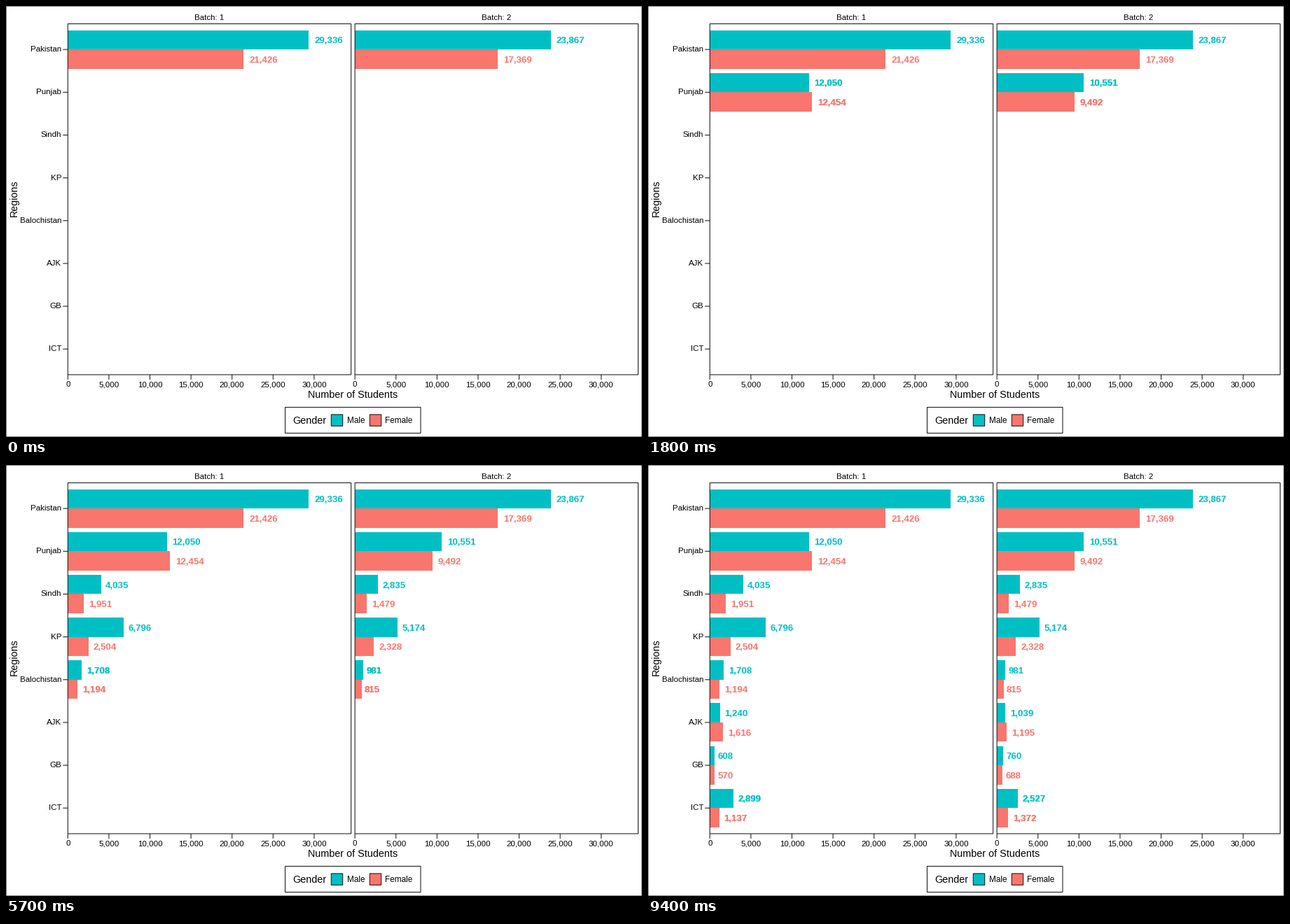
These frames come from a looping animation (908 by 616 pixels, 10000 ms). A matplotlib script:

```python
import matplotlib.pyplot as plt
from matplotlib.animation import FuncAnimation
from matplotlib.patches import Rectangle

WIDTH, HEIGHT, DPI = 908, 616, 100
FRAME_MS, FRAMES = 100, 100
TEAL, CORAL, INK = "#00BFC4", "#F8766D", "#1a1a1a"
PX = 72 / DPI  # points per pixel
LINE_W = 1.067 * PX

PANELS = (88.3, 498.15)
PANEL_W, TOP, BOTTOM = 404.35, 25.45, 526.96
SCALE = 58.6 / 5000
ROW_STEP = (BOTTOM - TOP) / 8.2
ROW_0 = TOP + 0.6 * ROW_STEP
BAR_H = 0.45 * ROW_STEP
TICK = 7

# region: (male, female) for each batch
REGIONS = {
    "Pakistan": ((29336, 21426), (23867, 17369)),
    "Punjab": ((12050, 12454), (10551, 9492)),
    "Sindh": ((4035, 1951), (2835, 1479)),
    "KP": ((6796, 2504), (5174, 2328)),
    "Balochistan": ((1708, 1194), (981, 815)),
    "AJK": ((1240, 1616), (1039, 1195)),
    "GB": ((608, 570), (760, 688)),
    "ICT": ((2899, 1137), (2527, 1372)),
}
APPEAR_MS = (0, 1200, 2500, 3800, 5100, 6400, 7600, 8800)
DOUBLE_MS = (500, 1800, 3100, 4400, 5700, 7000, 8200, 9400)

plt.rcParams["font.family"] = "Liberation Sans"
fig = plt.figure(figsize=(WIDTH / DPI, HEIGHT / DPI), dpi=DPI, facecolor="white")
ax = fig.add_axes([0, 0, 1, 1])
ax.set_xlim(0, WIDTH)
ax.set_ylim(HEIGHT, 0)
ax.axis("off")


def text(x, y, label, size=11.5, ha="center", color="black", **kw):
    return ax.text(x, y, label, fontsize=size * PX, ha=ha, va="baseline",
                   color=color, **kw)


def line(x0, y0, x1, y1):
    ax.plot([x0, x1], [y0, y1], color=INK, lw=LINE_W, solid_capstyle="butt",
            snap=False, zorder=4)


def frame(x0, y0, x1, y1, fill="none"):
    ax.add_patch(Rectangle((x0, y0), x1 - x0, y1 - y0, facecolor=fill,
                           edgecolor=INK, lw=LINE_W, snap=False, zorder=4))


def bar(x, y0, y1, value, color):
    """Draw one bar and its label; return (bar, label, overprinted label)."""
    end = x + value * SCALE
    left, right, top, bottom = map(round, (x, end, y0, y1))
    rect = Rectangle((left, top), right - left, bottom - top,
                     facecolor=color, lw=0, antialiased=False, zorder=2)
    ax.add_patch(rect)
    label = f"{value:,}"
    commas = label.count(",")
    label_w = 13.2 * (0.556 * (len(label) - commas) + 0.278 * commas)
    labels = [text(end + 0.2 * label_w, round((y0 + y1) / 2 + 4.9), label, 13.2,
                   "left", color, weight="bold", zorder=5) for _ in range(2)]
    return rect, *labels


def draw_static():
    frame(0, 0, WIDTH, HEIGHT)
    for number, x in enumerate(PANELS, 1):
        frame(x, TOP, x + PANEL_W, BOTTOM)
        text(x + PANEL_W / 2, 20, f"Batch: {number}")
        for value in range(0, 30001, 5000):
            tick = x + value * SCALE
            line(tick, BOTTOM, tick, BOTTOM + TICK)
            text(tick, 544, f"{value:,}")
    for i, name in enumerate(REGIONS):
        y = ROW_0 + i * ROW_STEP
        line(PANELS[0] - TICK, y, PANELS[0], y)
        text(79.2, round(y + 3), name, ha="right")
    text(495, 560, "Number of Students", 14.4)
    text(15.6, 275, "Regions", 14.4, rotation=90, rotation_mode="anchor")
    frame(398.5, 573.5, 592, 610.5)
    text(409, 597, "Gender", 14.4, "left")
    for x, name, color in ((464, "Male", TEAL), (519, "Female", CORAL)):
        frame(x + 0.3, 583.9, x + 16.7, 600.3, color)
        text(x + 22.5, 596, name, 11.7, "left")


def draw_rows():
    rows = []
    for i, batches in enumerate(REGIONS.values()):
        y = ROW_0 + i * ROW_STEP
        row = []
        for x, (male, female) in zip(PANELS, batches):
            row.append(bar(x, y - BAR_H, y, male, TEAL))
            row.append(bar(x, y, y + BAR_H, female, CORAL))
        rows.append(row)
    return rows


draw_static()
rows = draw_rows()


def update(index):
    now = index * FRAME_MS
    for i, row in enumerate(rows):
        shown = now >= APPEAR_MS[i]
        row_end = APPEAR_MS[i + 1] if i + 1 < len(rows) else FRAMES * FRAME_MS
        doubled = DOUBLE_MS[i] <= now < row_end
        for rect, label, overprint in row:
            rect.set_visible(shown)
            label.set_visible(shown)
            overprint.set_visible(doubled)
    return []


animation = FuncAnimation(fig, update, frames=FRAMES, interval=FRAME_MS,
                          init_func=lambda: update(0), repeat=True, repeat_delay=0)
plt.show()
```
